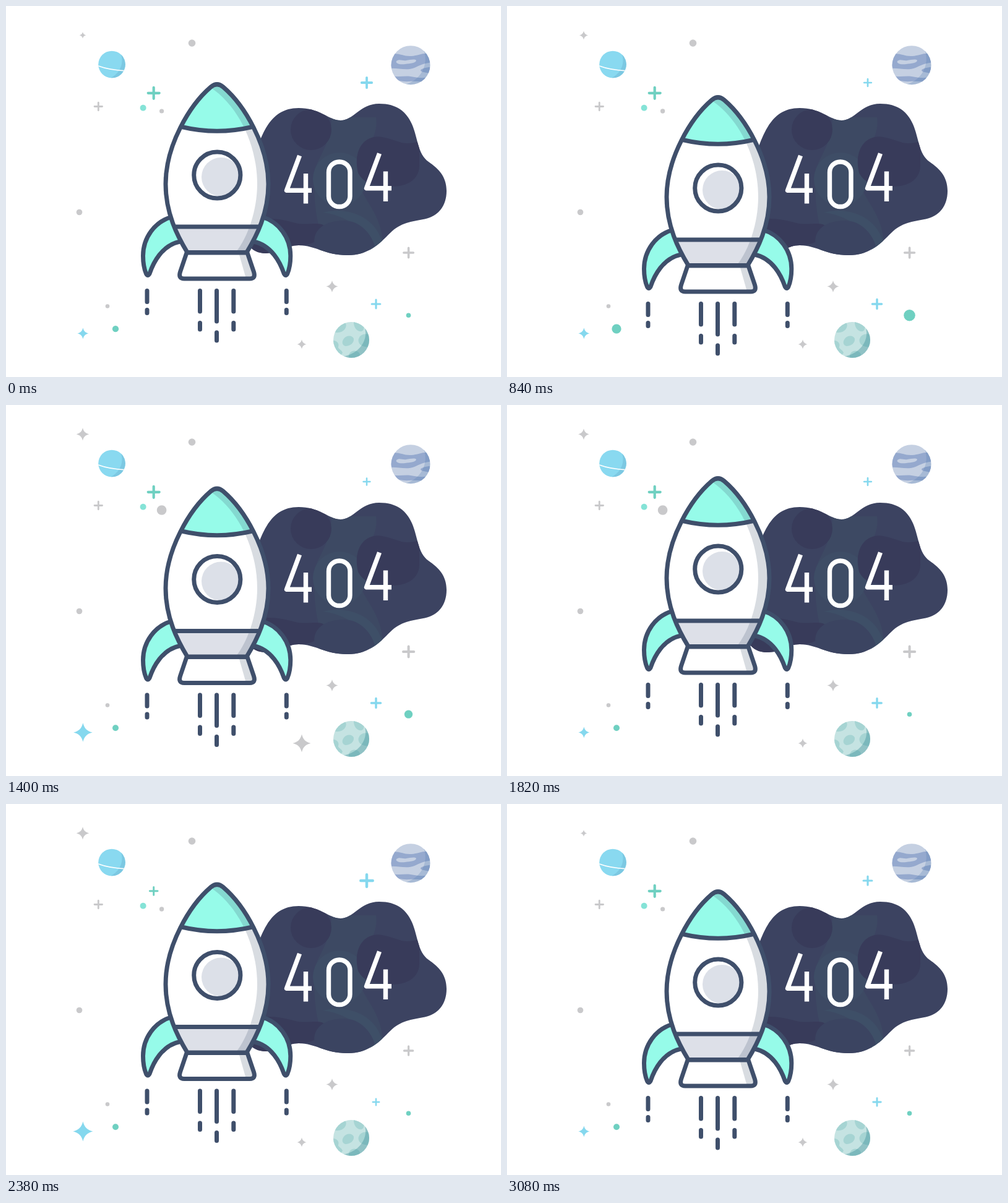
Animation, 800 px wide and 600 px high, one loop 3.22 s. Source, as an HTML page:

```html
<!DOCTYPE html>
<html lang="en">
<head>
<meta charset="utf-8">
<title>404</title>
<style>
  html, body { margin: 0; width: 100%; height: 100%; overflow: hidden; background: #fff; }
  svg { display: block; width: 800px; height: 600px; }
  .line { fill: none; stroke: #3f4f6b; stroke-width: 7; stroke-linecap: round; stroke-linejoin: round; }
  .mint { fill: #96fbe9; }
  .shade { fill: #3f4f6b; opacity: .2; }
  .digit { fill: none; stroke: #fff; stroke-width: 7.4; stroke-linejoin: round; }
  .plus { fill: none; stroke-width: .38; stroke-linecap: round; }
</style>
</head>
<body>
<svg viewBox="0 0 800 600" role="img" aria-label="404">
  <defs>
    <path id="blob" d="M395 260C412 215 422 165 473 165C508 165 522 185 541 185C562 185 572 158 603 158C632 158 647 171 656 191C666 214 665 239 683 252C697 262 712 274 712 299C712 324 698 340 677 344.500C655 349 638 350 621 367C603 385 586 403 552 403C515 403 500 387 473 387C452 387 446 400 420 400C395 400 380 380 380 340Z"/>
    <path id="hull" d="M331 131Q341 122.500 351 131C385 160 424 225 424 288C424 335 405 372 389 398.500H293C277 372 258 335 258 288C258 225 297 160 331 131Z"/>
    <path id="skirt" d="M292 399L281.500 430Q278 441 288 441H394Q404 441 400.500 430L390 399Z"/>
    <path id="fin" d="M268 341C240 349 221.500 375 221.500 404C221.500 418 224 427 226.500 433Q229 438 232 433C238 415 252 387 281 381"/>
    <path id="four" class="digit" d="M474.500 242L453.500 298.300H494M484.500 271V319.500"/>
    <clipPath id="inBlob"><use href="#blob"/></clipPath>
    <clipPath id="inHull"><use href="#hull"/></clipPath>
    <clipPath id="inSkirt"><use href="#skirt"/></clipPath>
    <clipPath id="inBlue"><circle cx="171" cy="94.500" r="21.800"/></clipPath>
    <clipPath id="inViolet"><circle cx="654" cy="95.700" r="31.500"/></clipPath>
    <clipPath id="inTeal"><circle cx="558" cy="540" r="29"/></clipPath>
  </defs>

  <g id="sky"></g>

  <g clip-path="url(#inBlue)">
    <rect x="145" y="70" width="52" height="50" fill="#89d9f0"/>
    <path d="M183 70C192 88 188 108 166 118H200V70Z" fill="#7cc8e2"/>
    <path d="M148 96.500Q166 103.500 195 105" fill="none" stroke="#fff" stroke-width="1.800"/>
  </g>

  <g clip-path="url(#inViolet)">
    <rect x="620" y="62" width="68" height="68" fill="#c5d0e2"/>
    <path d="M620 79C634 74 640 82 655 81C668 80 674 74 690 78V91C678 92 670 95 660 100C648 105 634 100 620 101Z" fill="#95a9ce"/>
    <path d="M631 89C636 85 640 89 647 88C653 87 661 85 663 88C663 92 653 93 645 94C636 95 629 93 631 89Z" fill="#c5d0e2"/>
    <path d="M690 98C680 99 671 101 670 104C671 108 680 107 690 110Z" fill="#95a9ce"/>
    <path d="M620 111C632 117 642 112 654 114C666 116 676 118 690 113V120C674 124 664 121 652 122C640 123 632 119 620 119Z" fill="#95a9ce"/>
    <path d="M672 65C686 88 674 122 640 128H690V65Z" fill="#4d77aa" opacity=".25"/>
  </g>

  <g clip-path="url(#inTeal)">
    <rect x="528" y="510" width="60" height="60" fill="#c5e3e2"/>
    <g fill="#a6d4d3">
      <path d="M528 527C538 530 546 527 549 520C551 514 548 510 544 508L528 515Z"/>
      <path d="M562 509C561 520 568 528 575 526C580 524 579 515 576 510Z"/>
      <path d="M546 538C550 532 560 532 562 538C563 545 556 550 549 550C543 549 542 543 546 538Z"/>
      <path d="M528 541C535 541 539 546 537 551C536 555 542 555 544 561L539 567L528 555Z"/>
      <path d="M570 538C573 530 581 530 588 531V551C579 553 567 548 570 538Z"/>
      <path d="M554 569C553 560 560 556 566 558C573 560 573 566 571 570Z"/>
    </g>
    <path d="M576 511C590 535 574 562 544 567L552 572H590V511Z" fill="#2d8390" opacity=".35"/>
  </g>

  <use href="#blob" fill="#3c4361"/>
  <g clip-path="url(#inBlob)">
    <path d="M526 180H598C603 215 575 235 570 270C566 310 610 330 609 390L520 395C500 350 500 330 497 280C496 250 526 230 526 180Z" fill="#3d4963"/>
    <circle cx="539" cy="280" r="43" fill="#3e4d66"/>
    <circle cx="493" cy="200" r="33" fill="#383b5a"/>
    <path d="M569 270C560 232 580 207 608 212C635 217 640 227 668 219V255C670 285 640 295 615 291C595 287 580 290 569 270Z" fill="#383b5a"/>
    <path d="M380 353C420 338 445 345 468 351C488 356 517 345 516 362C514 378 495 386 470 388C445 391 435 402 380 404Z" fill="#383b5a"/>
    <path d="M512 334C560 322 607 348 610 395L590 405C588 370 560 340 512 334Z" fill="#3e4f67"/>
    <path d="M498 381C498 358 520 347 546 347C572 347 590 368 596 388L560 410H515Z" fill="#3b4461"/>
  </g>

  <use href="#four"/>
  <rect class="digit" x="521.500" y="252" width="34.500" height="72.500" rx="17"/>
  <use href="#four" x="129" y="-3.500"/>

  <g id="rocket">
    <g id="side">
      <use href="#fin" class="mint"/>
      <use href="#fin" class="line"/>
      <path class="line" d="M228 460.500V478.500M228 491.500V496.500M313.500 460.500V494M313.500 512.500V523"/>
    </g>
    <use href="#side" transform="translate(681.300 0) scale(-1 1)"/>
    <path class="line" d="M340.500 460.500V510M340.500 528V541"/>

    <use href="#skirt" fill="#fff"/>
    <path class="shade" clip-path="url(#inSkirt)" d="M376 399L388 441H410V399Z"/>
    <use href="#skirt" class="line"/>

    <use href="#hull" fill="#fff"/>
    <g clip-path="url(#inHull)">
      <path class="mint" d="M250 110H430V195H398Q341 209 284 195H250Z"/>
      <rect x="250" y="357" width="180" height="42" fill="#dde0e8"/>
      <path class="shade" d="M331 132C376 162 406 225 406 288C406 330 391 374 371 399H440V110H331Z"/>
    </g>
    <path class="line" d="M284 195.500Q341 209 398 195.500M273 357H409"/>
    <use href="#hull" class="line"/>
    <circle cx="341.300" cy="273.500" r="37.500" fill="#fff"/>
    <circle cx="347.500" cy="276.500" r="31.500" fill="#dce0e8"/>
    <circle class="line" cx="341.300" cy="273.500" r="37.600"/>
  </g>
</svg>

<script>
const STEP = 140, COUNT = 23;
const GREY = '#c9c9cb', BLUE = '#85d8ee', TEAL = '#6fd0c1';

const shapes = {
  dot: 'M-1 0A1 1 0 1 1 1 0A1 1 0 1 1 -1 0Z',
  star: 'M0 -1C.15 -.42 .42 -.15 1 0C.42 .15 .15 .42 0 1C-.15 .42 -.42 .15 -1 0C-.42 -.15 -.15 -.42 0 -1Z',
  plus: 'M-.82 0H.82M0 -.82V.82'
};

const sky = document.getElementById('sky');
const rocket = document.getElementById('rocket');
const sparks = [];

// A spark rests at radius r and swells (or shrinks) by gain around each peak.
function spark(shape, x, y, colour, r, gain = 0, span = 1, ...peaks) {
  const node = document.createElementNS('http://www.w3.org/2000/svg', 'path');
  node.setAttribute('d', shapes[shape]);
  node.setAttribute('class', shape);
  node.setAttribute(shape === 'plus' ? 'stroke' : 'fill', colour);
  sky.append(node);
  sparks.push({ node, x, y, r, gain, span, peaks });
}

spark('dot', 300.5, 60, GREY, 5.8);
spark('dot', 118.5, 333.5, GREY, 4.8);
spark('dot', 164, 485.5, GREY, 3.3);
spark('dot', 221.6, 164.8, '#85e3d7', 5);
spark('dot', 251.6, 170, GREY, 3.6, 5, 6, 11.5);
spark('dot', 177, 522.2, TEAL, 5, 4.4, 4.5, 4);
spark('dot', 650.5, 500.2, TEAL, 3.8, 6.5, 5, 7.3);
spark('star', 124, 47.3, GREY, 5.3, 5, 6, 9.5, 16.5);
spark('star', 124.4, 529.5, BLUE, 9, 7, 3.5, 9.3, 17.2);
spark('star', 527, 453.5, GREY, 9.6);
spark('star', 478, 547, GREY, 7.6, 7, 3, 10);
spark('plus', 149.3, 162.5, GREY, 7.6);
spark('plus', 238.7, 140.8, TEAL, 11, -6.5, 2.6, 3, 18.3);
spark('plus', 583, 124, BLUE, 6.6, 5.2, 5, 2, 17);
spark('plus', 650.6, 399, GREY, 10.5, -6, 4, 3, 19.5);
spark('plus', 598, 482, BLUE, 9.2, -3.2, 7, 18.5);

// Cosine bump: 1 at the peak, 0 beyond the span; wraps round the loop.
function bump(step, peak, span) {
  const gap = Math.abs(step - peak);
  const u = Math.min(gap, COUNT - gap) / span;
  return u < 1 ? (1 + Math.cos(Math.PI * u)) / 2 : 0;
}

// The rocket floats on a smooth closed curve through a few poses.
const poses = [[0, 0], [3, -4], [6, 21], [7, 28.5], [10, 8.5],
  [13, -8], [15, -8.5], [17, 3.5], [20, 23.5], [22, 15]];

function pose(i) {
  const n = poses.length, lap = Math.floor(i / n);
  const [at, y] = poses[i - lap * n];
  return [at + lap * COUNT, y];
}

function slope(i) {
  const [a, ya] = pose(i - 1), [b, yb] = pose(i + 1);
  return (yb - ya) / (b - a);
}

function lift(step) {
  const i = poses.findLastIndex(([at]) => at <= step);
  const [a, ya] = pose(i), [b, yb] = pose(i + 1);
  const d = b - a, u = (step - a) / d, v = 1 - u;
  return ya * v * v * (1 + 2 * u) + yb * u * u * (1 + 2 * v)
    + d * u * v * (slope(i) * v - slope(i + 1) * u);
}

function draw(step) {
  rocket.setAttribute('transform', `translate(0 ${lift(step)})`);
  for (const { node, x, y, r, gain, span, peaks } of sparks) {
    const size = peaks.reduce((sum, peak) => sum + gain * bump(step, peak, span), r);
    node.setAttribute('transform', `translate(${x} ${y}) scale(${size})`);
  }
}

const start = performance.now();
let shown = -1;
function tick() {
  const step = Math.floor((performance.now() - start) / STEP) % COUNT;
  if (step !== shown) draw(shown = step);
  requestAnimationFrame(tick);
}
tick();
</script>
</body>
</html>
```
